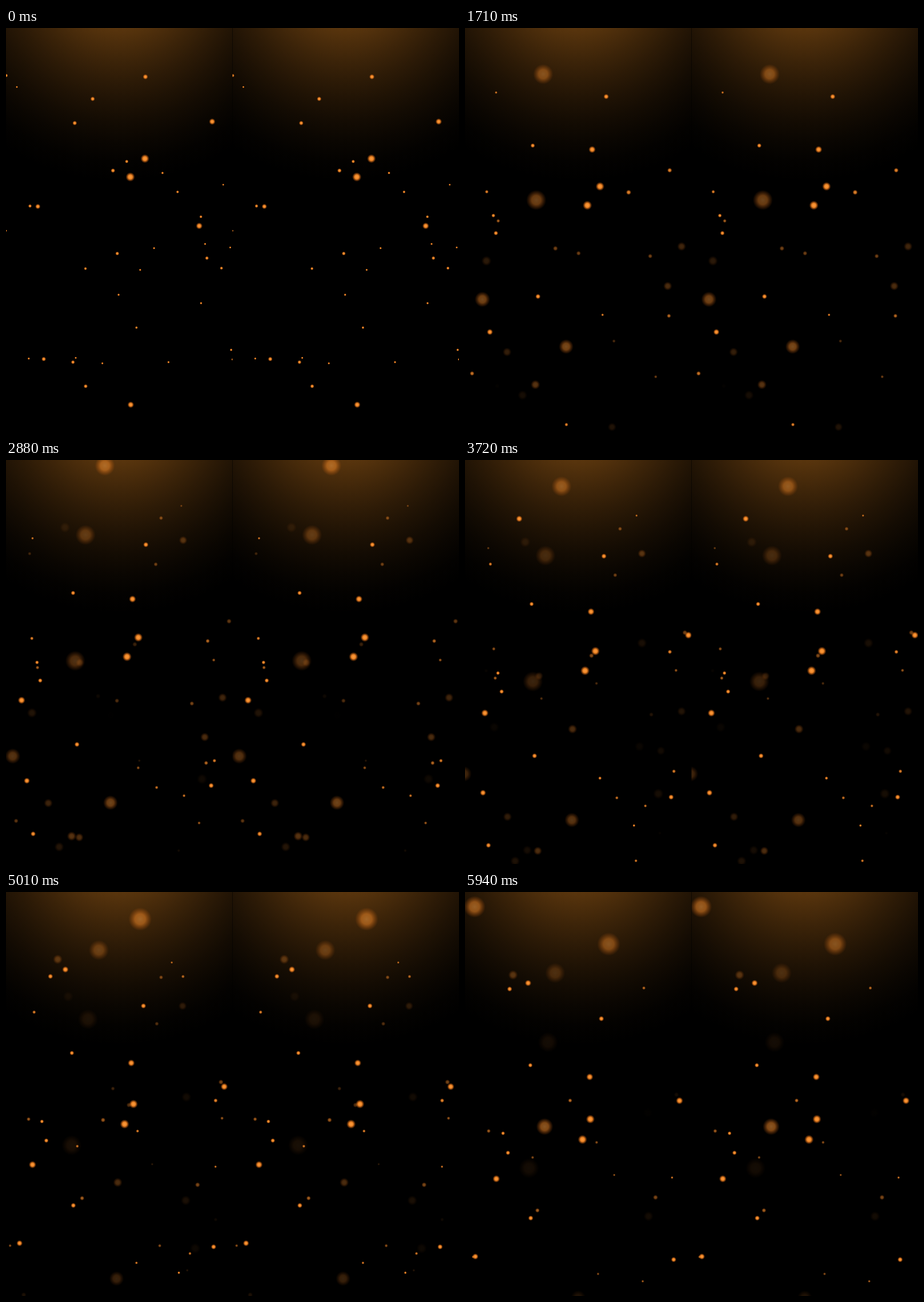
Write an HTML page with a canvas that moves like this. It is 793x706 px and loops after 5.97 s.

```html
<!DOCTYPE html>
<html lang="en">
<head>
<meta charset="utf-8">
<title>Falling embers</title>
<style>
  html, body { margin: 0; width: 100%; height: 100%; overflow: hidden; background: #000; }
  canvas { display: block; }
</style>
</head>
<body>
<canvas id="stage" width="793" height="706"></canvas>
<script>
const ctx = document.getElementById('stage').getContext('2d');
const LOOP = 5.97, HALF = 396.5, H = 706, MID = 3.3;

let seed = 11;
const random = (min, max) => {
  seed = seed * 16807 % 2147483647;
  return min + (max - min) * seed / 2147483647;
};

// Bigger embers are nearer, so they fall faster; out-of-focus ones dim with age.
const fallSpeed = r => 17 + 2 * r;
const strength = (r, age) => r > 6.2 ? Math.max(.08, .6 - .1 * age) : 1;

// The most prominent embers: x and y at MID, sideways speed, radius, birth
const leads = [
  [211, 356, -2, 6, -1], [230, 322, -4, 5.7, -1], [117, 242, -1, 3, -1],
  [221, 254, -1, 4.6, .2], [123, 507, -3, 3.4, .2], [244, 158, -2, 3.5, .2],
  [56, 363, 4, 2.6, .2], [62, 395, 5, 3, .2], [31, 431, 9, 4.8, 2.2],
  [34, 571, -6, 4, 1.1], [360, 579, 2, 3.5, 2.2], [92, 92, 7, 4.2, 3.1], [394, 295, -7, 4.7, 3.1],
  [140, 149, 2, 13, 0], [120, 369, -3, 13, 0], [5, 533, -16, 10, .2], [185, 614, 5, 9.5, 1.2],
  [171, 28, -5, 13, 2.2], [204, -33, 18, 15, 4.3], [30, -93, -5, 14, 5.3], [150, 307, -4, 11, 5.3]
].map(([x, y, vx, r, birth]) => ({ x, y, vx, r, birth, at: MID, death: 9, power: 1 }));

function scatter(count, make) {
  return Array.from({ length: count }, () => {
    const e = { x: random(0, HALF), y: random(70, H), vx: random(-8, 8), power: 1, ...make() };
    return { at: Math.max(0, e.birth), ...e };
  });
}

const opening = scatter(36, () => ({ r: 1.4 + 3 * random(0, 1) ** 2, birth: -1, death: .7 }));
const specks = scatter(44, () => {
  const birth = random(.1, 5);
  return { r: random(1.6, 3.4), birth, death: birth + random(2, 4), power: random(.4, 1) };
});
const haze = scatter(16, () => {
  const birth = random(.1, 4);
  return { r: random(5, 7), birth, death: birth + 3, power: random(.15, .35) };
});
const embers = [...haze, ...leads, ...specks, ...opening];

function glow() {
  const g = ctx.createRadialGradient(198, -100, 90, 198, -100, 368);
  for (let k = 0; k <= 1; k += .125) g.addColorStop(k, `rgba(94,56,14,${(1 - k) ** 1.6})`);
  ctx.globalAlpha = 1;
  ctx.fillStyle = g;
  ctx.fillRect(0, 0, HALF, 280);
}

function drawEmber({ x, y, vx, r, birth, death, at, power }, t) {
  const age = t - birth;
  const fade = Math.min(1, age / .6, (death - t) / .6);
  if (fade <= 0) return;
  const R = r * 1.35;
  const px = x + vx * (t - at), py = y + fallSpeed(r) * (t - at);
  const g = ctx.createRadialGradient(px, py, 0, px, py, R);
  g.addColorStop(0, 'rgba(255,160,66,1)');
  g.addColorStop(.45, 'rgba(250,140,40,.95)');
  g.addColorStop(1, 'rgba(225,100,10,0)');
  ctx.globalAlpha = fade * power * strength(r, age);
  ctx.fillStyle = g;
  ctx.fillRect(px - R, py - R, 2 * R, 2 * R);
}

function drawHalf(t, left) {
  ctx.save();
  ctx.translate(left, 0);
  ctx.beginPath();
  ctx.rect(0, 0, HALF, H);
  ctx.clip();
  glow();
  embers.forEach(e => drawEmber(e, t));
  ctx.restore();
}

function frame() {
  const t = performance.now() / 1000 % LOOP;
  ctx.fillStyle = '#000';
  ctx.fillRect(0, 0, 793, H);
  drawHalf(t, 0);
  drawHalf(t, HALF);
  requestAnimationFrame(frame);
}
frame();
</script>
</body>
</html>
```
